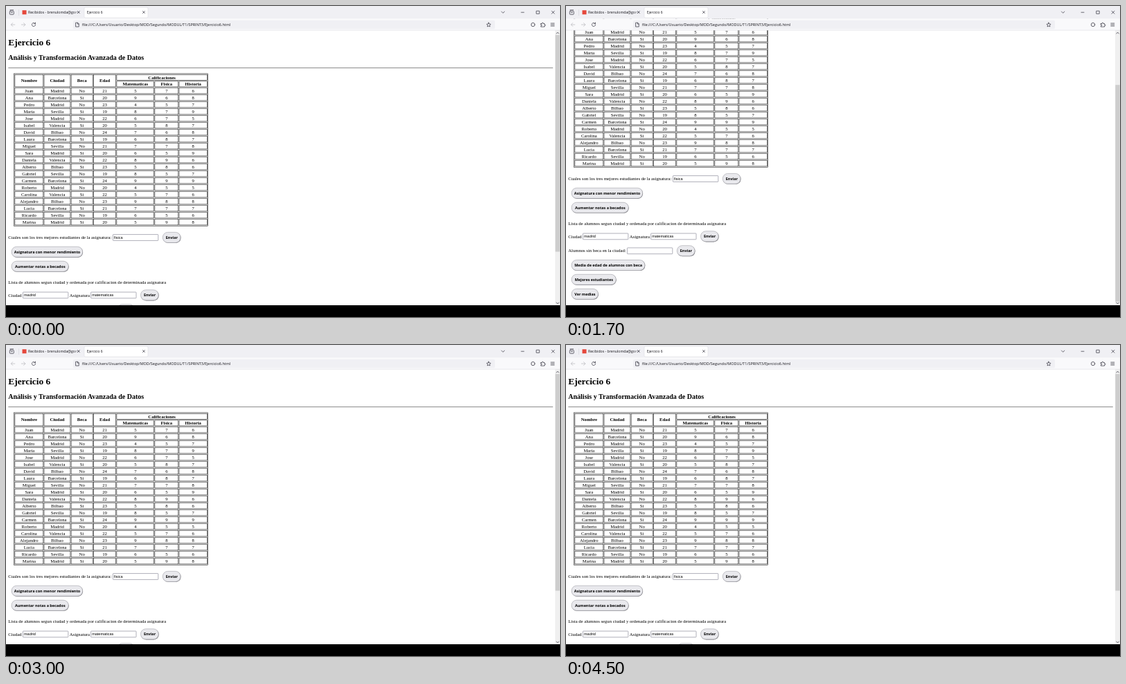
Write an HTML page that moves like this. It is 800 px wide and 450 px high and loops after 5000 ms.

```html
<!DOCTYPE html>
<html lang="es">
<head>
<meta charset="utf-8">
<title>Ejercicio 6</title>
<style>
@property --scroll { syntax: "<number>"; inherits: true; initial-value: 0; }
html, body { margin: 0; width: 100%; height: 100%; overflow: hidden; background: #fff; }
svg { display: block; width: 800px; height: 450px; animation: wheel 5s step-end infinite; }
#page { transform: translateY(calc(var(--scroll) * -1px)); }
#thumb { transform: translateY(calc(var(--scroll) * .85px)); }
@keyframes wheel {
  0% { --scroll: 0; }
  18% { --scroll: 3.8; }
  20% { --scroll: 32; }
  22% { --scroll: 42.5; }
  28% { --scroll: 43.4; }
  30% { --scroll: 66; }
  32% { --scroll: 82; }
  34% { --scroll: 85; }
  50% { --scroll: 63.3; }
  52% { --scroll: 45; }
  54% { --scroll: 37; }
  56% { --scroll: 19; }
  58% { --scroll: 4; }
  60% { --scroll: 0; }
  68% { --scroll: 10; }
  70% { --scroll: 34; }
  72% { --scroll: 42.5; }
  84% { --scroll: 35; }
  86% { --scroll: 15; }
  88% { --scroll: 3; }
  90%, 100% { --scroll: 0; }
}
text { white-space: pre; }
#page text { font: 6.67px "Liberation Serif", serif; }
#page .h1 { font-size: 13.33px; font-weight: bold; }
#page .h2 { font-size: 10px; font-weight: bold; }
#page .th { font-weight: bold; }
#page .value { font: 5.5px "Liberation Sans", sans-serif; }
#page .label { font: bold 5.45px "Open Sans", sans-serif; }
.mid { text-anchor: middle; }
.box { fill: none; stroke: #000; stroke-width: .55; }
.ui { font: 5.2px "Open Sans", sans-serif; fill: #15141a; }
.url { font-size: 5.48px; }
.icon { fill: none; stroke: #3a3944; stroke-width: .75; stroke-linecap: round; stroke-linejoin: round; }
.off { stroke: #b9b9be; }
</style>
</head>
<body>
<svg viewBox="0 0 800 450">
  <defs>
    <linearGradient id="fade">
      <stop offset="0" stop-color="#f0f0f4" stop-opacity="0"/>
      <stop offset="1" stop-color="#f0f0f4"/>
    </linearGradient>
  </defs>
  <rect width="800" height="450" fill="#fff"/>
  <g id="page"></g>

  <g id="scrollbar">
    <rect x="793" y="35" width="7" height="398" fill="#f0f0f0"/>
    <rect id="thumb" x="793.3" y="42" width="6.4" height="313.5" fill="#cdcdcd"/>
    <path d="M794.8 40l1.8-2 1.8 2M794.8 429l1.8 2 1.8-2" class="icon"/>
  </g>

  <g id="browser">
    <rect width="800" height="18.5" fill="#f0f0f4"/>
    <rect y="18.5" width="800" height="16.5" fill="#f9f9fb"/>
    <rect y="34.8" width="800" height=".5" fill="#d5d5da"/>
    <rect x="113" y="2" width="92" height="15" rx="1.8" fill="#fff" stroke="#d0d0d6" stroke-width=".4"/>
    <rect x="97" y="20.8" width="609" height="12.4" rx="1.8" fill="#f0f0f4"/>
    <path d="M18.5 5v9" stroke="#cfcfd5" stroke-width=".5"/>
    <rect x="23.5" y="6.2" width="6" height="6" fill="#e5483c"/>
    <text class="ui" x="32" y="11">Recibidos - brenulomda@gomu</text>
    <rect x="98" y="4" width="8" height="10" fill="url(#fade)"/>
    <rect x="106" y="4" width="6" height="10" fill="#f0f0f4"/>
    <text class="ui" x="116.8" y="11" style="font-size:4.9px">Ejercicio 6</text>
    <text class="ui url" x="110" y="29">file:///C:/Users/Usuario/Desktop/MOD/Segundo/MODUL/T1/SPRINT3/Ejercicio6.html</text>
    <g class="icon">
      <rect x="5.3" y="7.3" width="6" height="5" rx="1"/>
      <path d="M6 5.8h4.6M7.2 9.6h2.2"/>
      <path d="M103.4 7.5l3 3m0-3l-3 3M197.4 7.5l3 3m0-3l-3 3"/>
      <path d="M715.5 8l2.2 2.2 2.2-2.2M744 9.2h4M766.2 7.2h4v4h-4zM788 7.2l4 4m0-4l-4 4"/>
      <path class="off" d="M12.8 27h-5.4m2.3-2.4l-2.4 2.4 2.4 2.4M22.4 27h5.4m-2.3-2.4l2.4 2.4-2.4 2.4"/>
      <path d="M42 25.3a2.6 2.6 0 1 0 .6 1.8M42.5 24v1.7h-1.8"/>
      <path d="M101 24.2h2.6l1.6 1.6v4.2h-4.2zM103.4 24.3v1.8h1.7"/>
      <path d="M697 24.1l.9 1.9 2.1.3-1.5 1.5.4 2.1-1.9-1-1.9 1 .4-2.1-1.5-1.5 2.1-.3z"/>
      <circle cx="761" cy="27" r="2.7"/>
      <path d="M772.4 25.5h1.6a1 1 0 1 1 1.9 0h1.6v1.4a1 1 0 1 1 0 1.8v1.4h-5.1v-1.5a1 1 0 1 0 0-1.7z"/>
      <path d="M786.8 25h5M786.8 27h5M786.8 29h5"/>
    </g>
  </g>
  <rect y="433" width="800" height="17" fill="#000"/>
</svg>
<script>
const page = document.getElementById('page');

function add(tag, attrs, content) {
  const el = document.createElementNS('http://www.w3.org/2000/svg', tag);
  for (const key in attrs) el.setAttribute(key, attrs[key]);
  if (content !== undefined) el.textContent = content;
  page.append(el);
}

const text = (x, y, content, cls = '') => add('text', { x, y, class: cls }, content);
const frame = (x1, y1, x2, y2) =>
  add('rect', { x: x1, y: y1, width: x2 - x1, height: y2 - y1, class: 'box' });

function cell(x1, y1, x2, y2, content, cls = '') {
  frame(x1, y1, x2, y2);
  text((x1 + x2) / 2, (y1 + y2) / 2 + 2.2, content, 'mid ' + cls);
}

function input(x, y, value) {
  add('rect', { x: x + .4, y: y - 4.4, width: 65.4, height: 8.8, rx: .6,
    fill: '#fff', stroke: '#8f8f9d', 'stroke-width': .7 });
  text(x + 2, y + 2, value, 'value');
}

function button(x, y, width, label) {
  const pill = { y: y - 7.6, width: width - 1, height: 15, rx: 7.3 };
  add('rect', { ...pill, x: x + .8, y: y - 7, fill: '#77777c' });
  add('rect', { ...pill, x: x + .3, fill: '#e9e9ed', stroke: '#a2a2a8', 'stroke-width': .6 });
  text(x + width / 2, y + 2, label, 'label mid');
}

// Headings
text(3.3, 56.8, 'Ejercicio 6', 'h1');
text(3.3, 78.4, 'Análisis y Transformación Avanzada de Datos', 'h2');
add('rect', { x: 3.3, y: 89.2, width: 786.5, height: .85, fill: '#777' });

// Grades table
const cols = [[12.9, 53.8], [55, 92.9], [94.1, 125.2], [126.4, 158.7],
  [159.9, 213.7], [214.9, 248.8], [250, 290.4]];
const heads = ['Nombre', 'Ciudad', 'Beca', 'Edad', 'Matematicas', 'Fisica', 'Historia'];
const students = `Juan Madrid No 21 5 7 6
Ana Barcelona Si 20 9 6 8
Pedro Madrid No 23 4 5 7
Maria Sevilla Si 19 8 7 9
Jose Madrid No 22 6 7 5
Isabel Valencia Si 20 5 8 7
David Bilbao No 24 7 6 8
Laura Barcelona Si 19 6 8 7
Miguel Sevilla No 21 7 7 8
Sara Madrid Si 20 6 5 9
Daniela Valencia No 22 8 9 6
Alberto Bilbao Si 23 5 8 6
Gabriel Sevilla No 19 8 5 7
Carmen Barcelona Si 24 9 9 9
Roberto Madrid No 20 4 5 5
Carolina Valencia Si 22 5 7 6
Alejandro Bilbao No 23 9 8 8
Lucia Barcelona Si 21 7 7 7
Ricardo Sevilla No 19 6 5 6
Marina Madrid Si 20 5 9 8`.split('\n');

frame(11.6, 97.9, 291.7, 318.2);
cell(cols[4][0], 99.2, cols[6][1], 107.7, 'Calificaciones', 'th');
heads.forEach((head, c) => cell(cols[c][0], c < 4 ? 99.2 : 108.9, cols[c][1], 116.9, head, 'th'));
students.forEach((line, r) => line.split(' ').forEach((value, c) => {
  const y = 118.2 + 10 * r;
  cell(cols[c][0], y, cols[c][1], y + 8.7, value);
}));

// Forms
text(3.3, 337.2, 'Cuales son los tres mejores estudiantes de la asignatura:');
input(154, 335, 'fisica');
button(226, 335, 26.7, 'Enviar');
button(7.7, 355.9, 103.6, 'Asignatura con menor rendimiento');
button(7.7, 376.8, 83.2, 'Aumentar notas a becados');
text(3.3, 401.6, 'Lista de alumnos segun ciudad y ordenada por calificacion de determinada asignatura');
text(3.3, 420.5, 'Ciudad');
input(24, 418.4, 'madrid');
text(91.8, 420.5, 'Asignatura');
input(122.2, 418.4, 'matematicas');
button(194.2, 418.4, 26.7, 'Enviar');
text(3.3, 441.4, 'Alumnos sin beca en la ciudad:');
input(88, 439.3, '');
button(160, 439.3, 26.7, 'Enviar');
button(7.7, 460.1, 106.8, 'Media de edad de alumnos con beca');
button(7.7, 480.9, 65.2, 'Mejores estudiantes');
button(7.7, 501.8, 39.4, 'Ver medias');
</script>
</body>
</html>
```
